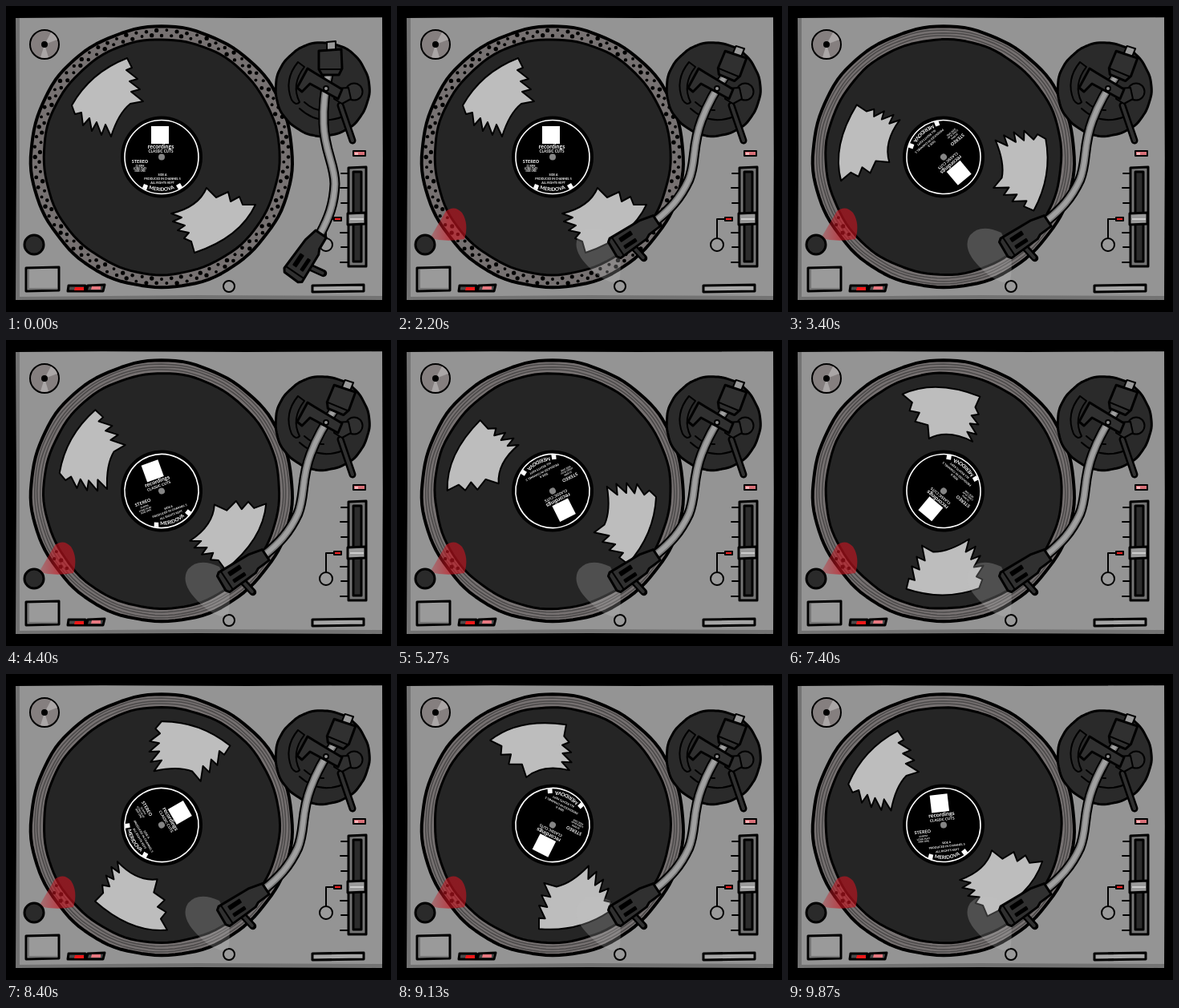
Recreate the animation shown at these times as an HTML page. Size 480 by 382 pixels, loop 9940 ms.

```html
<!DOCTYPE html>
<html lang="en">
<head>
<meta charset="utf-8">
<title>Turntable</title>
<style>
  html, body { margin: 0; width: 100%; height: 100%; overflow: hidden; background: #000; }
  svg { display: block; width: 100%; height: 100%; }
  .ink { stroke: #000; stroke-width: 3; stroke-linejoin: round; stroke-linecap: round; }
  .thin { stroke-width: 2; }
  .line { fill: none; }
  .dark { fill: #303030; }
  .metal { fill: #9a9a9a; }
  text { fill: #fff; font-family: Lato, "Open Sans", sans-serif; font-weight: 700; text-anchor: middle; }
</style>
</head>
<body>
<svg viewBox="0 0 480 382">
  <defs>
    <path id="beam" d="M41 290L61 256Q72 248 81 258Q90 272 84 291Q62 295 41 290Z"/>
    <clipPath id="beamClip"><use href="#beam"/></clipPath>
    <linearGradient id="red">
      <stop offset="0" stop-color="#c81420" stop-opacity=".25"/>
      <stop offset=".5" stop-color="#c81420" stop-opacity=".62"/>
    </linearGradient>
    <path id="rim" d="M151.500 188.500A42.500 42.500 0 0 0 236.500 188.500"/>
    <path id="tube" d="M403 80C399 98 395 124 396 147C397 181 410 198 410 222C409 248 402 265 392 284"/>
  </defs>

  <!-- deck -->
  <path fill="#737373" d="M12 15L120 14 300 15 469 14 470 190 469 367 240 366 12 367 13 180Z"/>
  <path fill="#949494" d="M17 15L469 15 469 362 240 361 17 363Z"/>

  <!-- adapter -->
  <circle class="ink thin" cx="48" cy="48" r="18" fill="#857f7f"/>
  <path fill="#aaa6a6" d="M48 48L56 33A17 17 0 0 1 64 42ZM48 48L43 64A17 17 0 0 0 53 64Z"/>
  <circle cx="48" cy="48" r="4"/>

  <!-- lower controls -->
  <path class="ink metal" d="M25 327L66 326 66 355 25 356Z"/>
  <path class="line" stroke="#777" stroke-width="2" d="M28 329V353H64"/>
  <path class="ink" fill="#4a4a4a" d="M78 349L99 349 98 356 77 356ZM102 349L123 348 121 356 100 356Z"/>
  <path fill="#f01818" d="M86 351H97V355H85Z"/>
  <path fill="#e87880" d="M107 350H118V354H106Z"/>
  <circle class="ink metal thin" cx="278" cy="350" r="7"/>
  <path class="ink" fill="#a6a6a6" d="M382 349L446 348 446 356 382 357Z"/>

  <!-- pitch fader and lamps -->
  <path class="ink thin" fill="#d87078" d="M433 181H448V187H433Z"/>
  <path fill="#f4b8bc" d="M435 183H439V186H435Z"/>
  <path class="ink line thin" d="M418 209H427M417 227H427M418 246H427M417 283H427M418 301H427M417 320H427"/>
  <path class="ink" fill="#747474" d="M427 202L449 201 449 325 427 325Z"/>
  <path class="ink" fill="#2c2c2c" d="M433 207H443V319H433Z"/>
  <path class="ink metal" d="M426 259L448 258 448 272 426 273Z"/>
  <path stroke="#ccc" stroke-width="2" d="M429 266H446"/>
  <path class="ink line thin" d="M408 266H399V290"/>
  <circle class="ink metal thin" cx="399" cy="298" r="8"/>
  <path class="ink thin" fill="#f02020" d="M409 264H418V268H409Z"/>

  <!-- platter -->
  <path id="plate" class="ink" fill="#767171" style="stroke-width:4"/>
  <g id="streaks" class="line" stroke="#4b4949" stroke-width="1.5"></g>
  <g id="dots"></g>
  <g id="record">
    <path id="vinyl" class="ink" fill="#252525"/>
    <g class="ink thin" fill="#bdbdbd">
      <path d="M82 124Q105 83 151 65L157 77 150 80 164 91 154 94 167 104 156 107 171 119 155 122Q140 134 131 163L124 148 119 161 113 145 107 156 104 140 96 149 94 133 86 135Z"/>
      <path d="M250 227L262 239 277 232 280 244 291 238 295 248 311 248Q292 289 235 308L231 294 222 290 228 283 214 280 223 274 208 269 219 264 206 259Q240 251 250 227Z"/>
    </g>
    <circle cx="194" cy="188.5" r="51"/>
    <circle cx="194" cy="188.5" r="46" fill="none" stroke="#fff" stroke-width="1.6"/>
    <path fill="#fff" d="M181 150H203V172H181Z"/>
    <text x="193" y="177.500" font-size="7">recordings</text>
    <text x="193" y="183" font-size="4.6">CLASSIC CUTS</text>
    <text x="167" y="196" font-size="5.5">STEREO</text>
    <g font-size="3">
      <text x="167" y="200.500">33 RPM</text>
      <text x="167" y="204">LONG PLAY</text>
      <text x="167" y="207">SIDE ONE</text>
    </g>
    <g font-size="3.6">
      <text x="195" y="212">SIDE A</text>
      <text x="195" y="216.500">PRODUCED IN CHANNEL 5</text>
      <text x="195" y="222">ALL RIGHTS KEPT</text>
    </g>
    <text font-size="6.2"><textPath href="#rim" startOffset="50%">MERIDOVA</textPath></text>
    <path fill="#fff" d="M172 222L177 224 175 230 170 227ZM212 224L217 221 220 226 215 229Z"/>
    <circle cx="194" cy="188.5" r="4" fill="#858585"/>
  </g>

  <!-- strobe lamp -->
  <use id="strobe" href="#beam" fill="url(#red)"/>
  <circle class="ink" cx="35" cy="298" r="12" fill="#2a2a2a"/>
  <path id="glow" fill="#c0c0c0" fill-opacity=".27" d="M266 283Q240 271 227 286Q218 300 232 318Q250 340 268 345L277 343Q280 330 278 308Z"/>

  <!-- tonearm -->
  <path id="base" class="ink" fill="#2a2a2a"/>
  <g class="ink line thin">
    <path d="M364 70Q346 92 356 117Q361 125 366 120Q355 98 372 76Z"/>
    <path d="M366 128Q390 150 420 138M372 120Q384 131 396 130"/>
  </g>
  <g id="arm">
    <path class="ink metal thin" d="M400 45L411 44 411 56 400 56Z"/>
    <g class="line">
      <use href="#tube" stroke="#000" stroke-width="13"/>
      <use href="#tube" stroke="#777" stroke-width="9"/>
      <use href="#tube" stroke="#a0a0a0" stroke-width="5.500"/>
    </g>
    <path class="ink dark" d="M390 56L418 54 419 78 415 86 394 86 390 79Z"/>
    <path class="ink line thin" d="M391 79H418"/>
    <g transform="translate(391 287) rotate(34)" class="ink">
      <path class="line" d="M12 39L30 36" style="stroke-width:9"/>
      <path class="line" d="M13 39L29 36.500" style="stroke:#303030;stroke-width:4"/>
      <path class="dark" d="M-8-3H8L9 14 12 20 14 60 10 63-11 62-14 58-12 14Z"/>
      <path class="thin" d="M-7 32H-3V48H-7ZM4 32H7V48H4Z"/>
      <path class="line thin" d="M-12 55H12"/>
    </g>
  </g>

  <!-- bearing, over the arm -->
  <g class="ink">
    <path class="line" d="M417 124L432 168" style="stroke-width:9"/>
    <path class="line" d="M417 124L432 168" style="stroke:#303030;stroke-width:4"/>
    <circle class="dark thin" cx="434" cy="107" r="10.500"/>
    <path class="dark thin" d="M411 103L427 102 430 116 419 122 409 116Z"/>
    <path class="dark" d="M376 78L384 83 419 104 414 116 379 97 369 107 363 102Z"/>
    <circle class="thin" cx="399" cy="103" r="3" fill="#949494"/>
  </g>
</svg>
<script>
const $ = id => document.getElementById(id);
const CX = 194, CY = 188.5, LOOP = 9940, STEP = 1000 / 15;

// A circle with a slightly unsteady hand-drawn edge
function roughCircle(cx, cy, r, wobble) {
  let d = '';
  for (let i = 0; i < 120; i++) {
    const a = i * Math.PI / 60;
    const q = r + wobble * (Math.sin(7 * a + r) + Math.sin(17 * a) * .6);
    d += (i ? 'L' : 'M') + (cx + q * Math.cos(a)).toFixed(1) + ' ' + (cy + q * Math.sin(a)).toFixed(1);
  }
  return d + 'Z';
}

function add(parent, tag, attrs) {
  const el = document.createElementNS('http://www.w3.org/2000/svg', tag);
  for (const key in attrs) el.setAttribute(key, attrs[key]);
  $(parent).append(el);
}

$('plate').setAttribute('d', roughCircle(CX, CY, 163, .5));
$('vinyl').setAttribute('d', roughCircle(CX, CY, 147, .4));
$('base').setAttribute('d', roughCircle(394.5, 104, 58.5, .3));

for (const r of [151.5, 155, 158.5]) add('streaks', 'path', { d: roughCircle(CX, CY, r, .3) });

const DOTS = 156;
for (let i = 0; i < DOTS; i++) {
  const a = i * 2 * Math.PI / DOTS;
  const r = (i % 2 ? 152 : 158) + .6 * Math.sin(i * 2.3);
  add('dots', 'circle', {
    cx: CX + r * Math.cos(a), cy: CY + r * Math.sin(a), r: 2.3 + .4 * Math.sin(i * 5.1)
  });
}

const show = (id, on) => $(id).style.display = on ? '' : 'none';

function draw(now) {
  const t = now % LOOP;
  const step = Math.floor(t / STEP + .06);
  const spinning = step >= 41;
  const swing = 22.6 * Math.min(step / 19, 1) ** 1.15;
  const turn = spinning ? (step - 40.5) * 360 / 27 : 0; // 33⅓ rpm

  $('arm').setAttribute('transform', `rotate(${swing} 399 104)`);
  $('record').setAttribute('transform', `rotate(${turn} ${CX} ${CY})`);
  show('strobe', step >= 27);
  show('glow', step >= 33);
  show('streaks', spinning);
  $('dots').setAttribute('clip-path', spinning ? 'url(#beamClip)' : 'none');
}

const start = performance.now();
function tick() {
  draw(performance.now() - start);
  requestAnimationFrame(tick);
}
tick();
</script>
</body>
</html>
```
